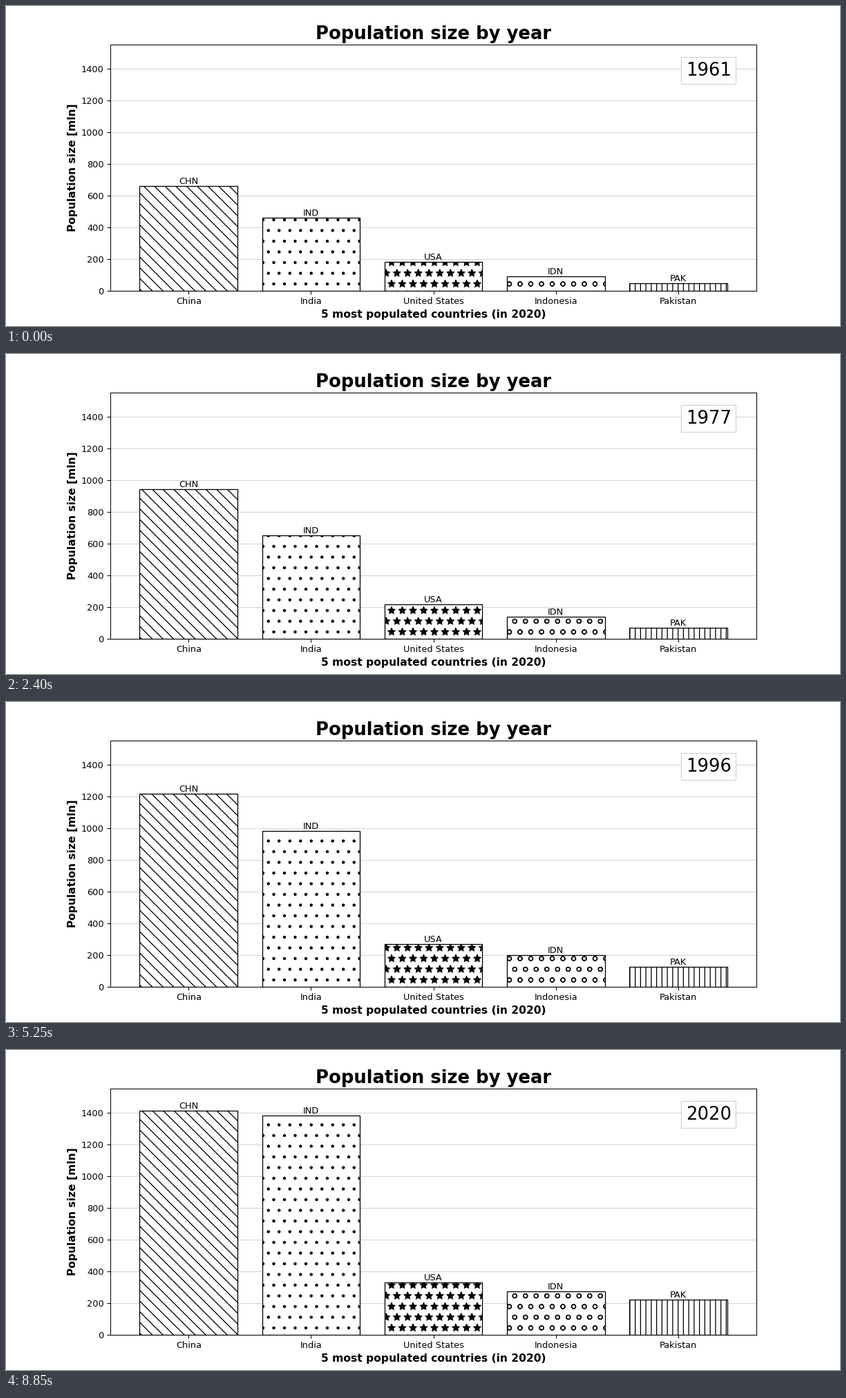
A matplotlib script that plays this animation: 1207x464 px, repeating every 9000 ms.

```python
import numpy as np
import matplotlib.pyplot as plt
from matplotlib.animation import FuncAnimation

WIDTH, HEIGHT, DPI = 1207, 464, 93
YEARS = np.arange(1961, 2021)
KNOTS = np.array([1961, 1981, 2001, 2020])


def piecewise(*points):
    """Straight growth between (year, millions) turning points."""
    return np.interp(YEARS, *zip(*points))


def smooth(*millions):
    """Cubic curve through the values at the knot years."""
    curve = np.polyfit(KNOTS - YEARS[0], millions, 3)
    return np.polyval(curve, YEARS - YEARS[0])


# name, code, hatch, population in millions for every year
COUNTRIES = [
    ("China", "CHN", "\\\\", piecewise(
        (1961, 660.3), (1962, 665.8), (1968, 774.5), (1974, 900.4),
        (1986, 1066.8), (1990, 1135.2), (1998, 1241.9), (2004, 1296.1),
        (2011, 1345.0), (2020, 1410.9))),
    ("India", "IND", ".", smooth(459.6, 715.4, 1075.0, 1380.0)),
    ("United States", "USA", "*", smooth(183.7, 229.5, 285.0, 329.5)),
    ("Indonesia", "IDN", "o", smooth(90.1, 150.9, 214.4, 273.5)),
    ("Pakistan", "PAK", "||", smooth(46.0, 80.6, 145.9, 220.9)),
]
names, codes, hatches, series = zip(*COUNTRIES)
population = np.array(series)

fig, ax = plt.subplots(figsize=(WIDTH / DPI, HEIGHT / DPI), dpi=DPI)
bars = ax.bar(names, population[:, -1], color="white", edgecolor="black",
              hatch=hatches)
ax.set_ylim(0, population.max() * 1.1)
ax.set_axisbelow(True)
ax.grid(axis="y", color="lightgray")
ax.set_title("Population size by year", fontsize=20, fontweight="bold")
ax.set_xlabel("5 most populated countries (in 2020)", fontsize=12,
              fontweight="bold")
ax.set_ylabel("Population size [mln]", fontsize=12, fontweight="bold")

labels = [ax.text(i, 0, code, ha="center", va="bottom")
          for i, code in enumerate(codes)]
year_text = ax.text(0.9609, 0.93, "", transform=ax.transAxes, fontsize=20,
                    ha="right", va="top",
                    bbox=dict(facecolor="white", edgecolor="lightgray", pad=5))


def update(i):
    for bar, label, value in zip(bars, labels, population[:, i]):
        bar.set_height(value)
        label.set_y(value)
    year_text.set_text(str(YEARS[i]))
    return [*bars, *labels, year_text]


def init():
    return update(0)


anim = FuncAnimation(fig, update, frames=len(YEARS), init_func=init,
                     interval=150, repeat=True, repeat_delay=0, blit=False)
plt.show()
```
